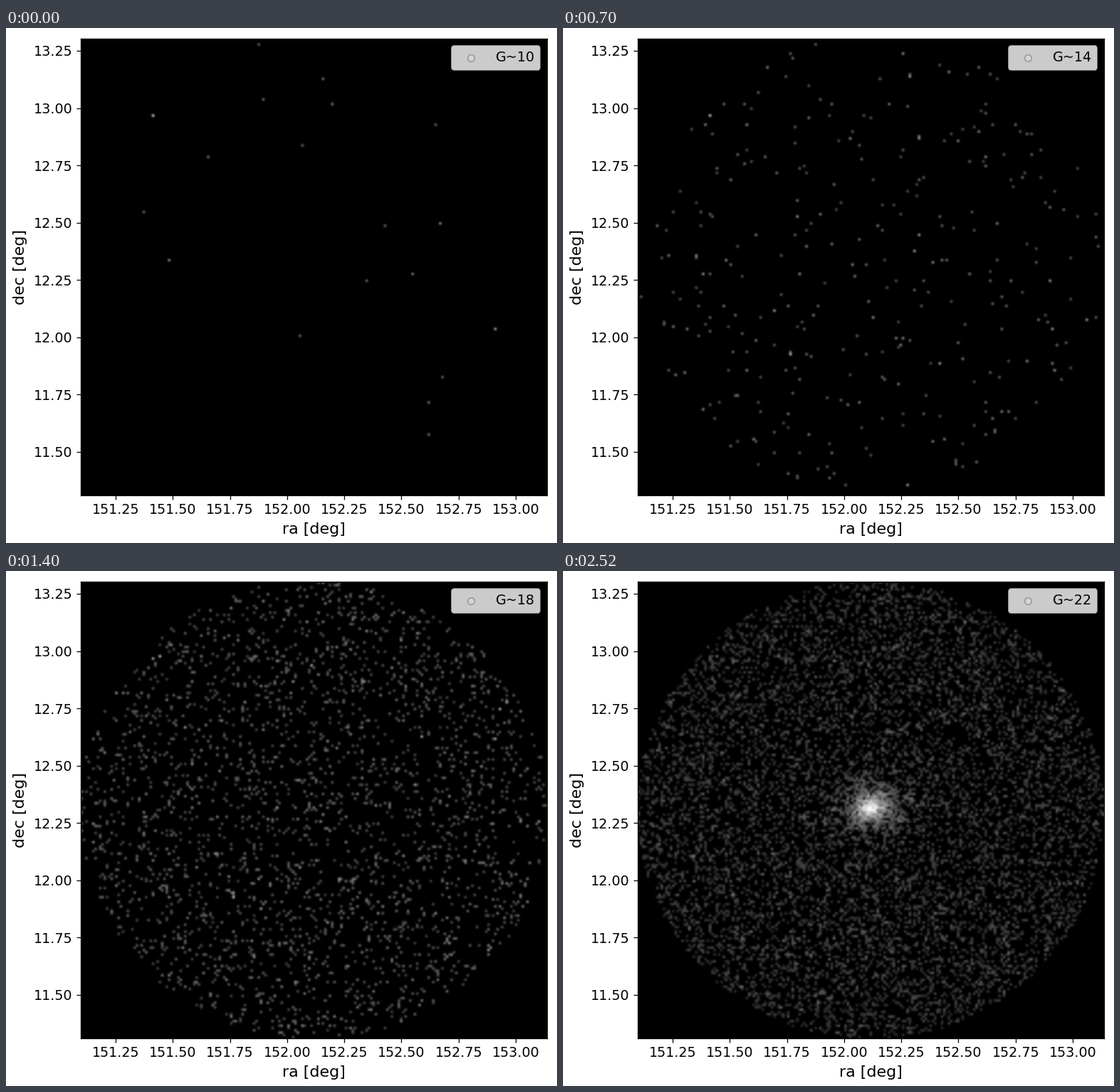
These frames come from a looping animation (774x724 px, 2.8 s). A matplotlib script:

```python
import numpy as np
import matplotlib.pyplot as plt
from matplotlib.animation import FuncAnimation

W, H, DPI = 774, 724, 100
K = 1.152                                   # type and line scale
LEFT, RIGHT, TOP, BOTTOM = 105, 760, 15.2, 656.8
NX, NY = 203, 199                           # sky cells
CELL = (RIGHT - LEFT) / NX

# first stars to appear, brightest first, as stage positions
FIRST = [(206, 122), (688, 422), (229, 328), (610, 274), (571, 345),
         (458, 106), (284, 180), (594, 528), (594, 571), (445, 71),
         (361, 100), (416, 164), (507, 354), (413, 432), (604, 135),
         (533, 277), (193, 258), (355, 23), (614, 490)]

# per magnitude step: new field stars, new cluster stars, gain
STEPS = [(0, 0, .55), (65, 0, .55), (240, 0, .53), (600, 0, .49),
         (1800, 8, .44), (3700, 560, .33), (3000, 750, .26)]

rng = np.random.default_rng(10)


def add(grid, col, row, weight):
    col, row = np.floor(col).astype(int), np.floor(row).astype(int)
    ok = (col >= 0) & (col < NX) & (row >= 0) & (row < NY)
    np.add.at(grid, (row[ok], col[ok]), weight[ok])


def add_first(grid):
    x, y = np.array(FIRST, float).T
    rank = np.arange(1, len(x) + 1)
    add(grid, (x - LEFT) / CELL, (y - TOP) / CELL, .6 + 2.4 / rank)


def add_field(grid, n):
    r, a = np.sqrt(rng.random(n)), rng.uniform(0, 2 * np.pi, n)
    add(grid, NX / 2 * (1 + r * np.cos(a)), NY / 2 * (1 + r * np.sin(a)),
        .5 + rng.exponential(.35, n))


def add_cluster(grid, n, tilt=-.2):
    r, a = rng.gamma(2, 1, n), rng.uniform(0, 2 * np.pi, n)
    u, v = 4.1 * r * np.cos(a), 3.1 * r * np.sin(a)
    add(grid, 101.7 + u * np.cos(tilt) - v * np.sin(tilt),
        98.4 + u * np.sin(tilt) + v * np.cos(tilt), np.ones(n))


def build_skies():
    grid, skies = np.zeros((NY, NX)), []
    add_first(grid)
    for field, cluster, gain in STEPS:
        add_field(grid, field)
        add_cluster(grid, cluster)
        skies.append(np.clip(gain * np.sqrt(grid), 0, 1))
    return skies


skies = build_skies()

plt.rcParams["font.family"] = "DejaVu Sans"
fig = plt.figure(figsize=(W / DPI, H / DPI), dpi=DPI, facecolor="white")
ax = fig.add_axes([LEFT / W, 1 - BOTTOM / H, (RIGHT - LEFT) / W,
                   (BOTTOM - TOP) / H], facecolor="black")
sky = ax.imshow(skies[0], cmap="gray", vmin=0, vmax=1, aspect="auto",
                interpolation="gaussian",
                extent=(151.097, 153.137, 11.311, 13.302))
ax.set_xticks(np.arange(151.25, 153.01, .25))
ax.set_yticks(np.arange(11.5, 13.26, .25))
ax.xaxis.set_major_formatter("{x:.2f}")
ax.yaxis.set_major_formatter("{x:.2f}")
ax.tick_params(labelsize=12 * K, length=3.5 * K, width=.8 * K, pad=3.5 * K)
for spine in ax.spines.values():
    spine.set_linewidth(.8 * K)
ax.set_xlabel("ra [deg]", fontsize=13.8 * K, labelpad=5 * K)
ax.set_ylabel("dec [deg]", fontsize=13.8 * K, labelpad=5.5 * K)

ax.scatter([], [], s=36 * K * K, c="0.84", edgecolors="0.6",
           linewidths=K, label="G~10")
legend = ax.legend(loc="upper right", fontsize=12 * K, framealpha=.8,
                   scatteryoffsets=[.43])
legend.get_frame().set_linewidth(K)
label = legend.get_texts()[0]


def draw(i):
    step = min(i, len(skies) - 1)           # the deepest view holds twice
    sky.set_data(skies[step])
    label.set_text(f"G~{10 + 2 * step}")
    return sky, legend


anim = FuncAnimation(fig, draw, frames=8, interval=350, repeat=True,
                     repeat_delay=0, blit=False)
plt.show()
```
